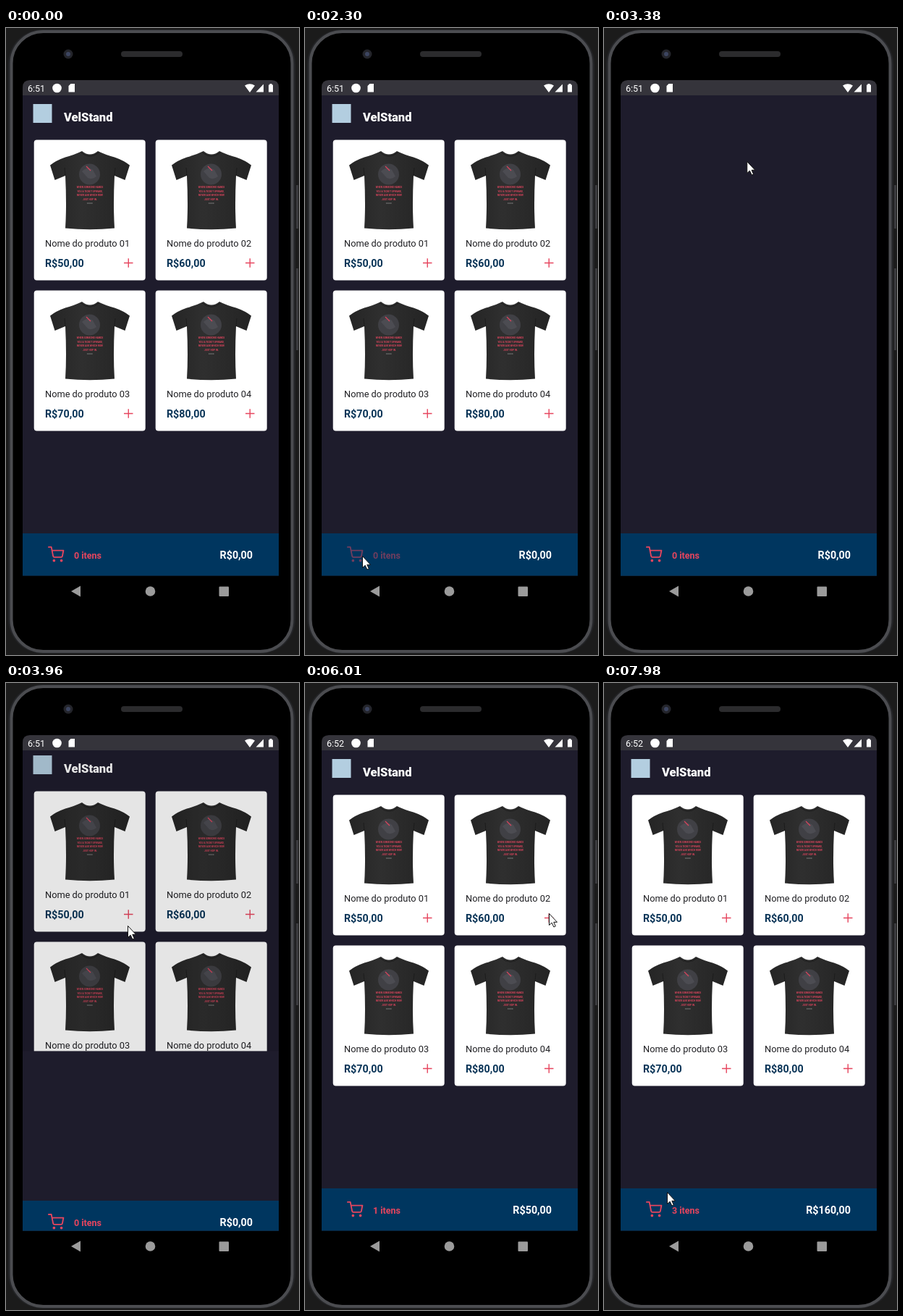
Animation of 405 by 866 pixels, one loop 8 s. Source, as an HTML page:

```html
<!DOCTYPE html>
<html lang="pt">
<head>
<meta charset="utf-8">
<style>
  html, body { margin: 0; width: 100%; height: 100%; overflow: hidden; background: #1b1b1b; }
  svg { display: block; }
  text { font-family: Roboto, sans-serif; }
  .price { font-size: 14.3px; font-weight: 700; }
  .print { font-size: 3.2px; font-weight: 600; fill: #d8445c; text-anchor: middle; }
  .plus { fill: none; stroke: #e6455e; stroke-width: 1.4; }
</style>
</head>
<body>
<svg width="405" height="866" viewBox="0 0 405 866">
  <defs>
    <linearGradient id="cloth">
      <stop offset="0" stop-color="#252525"/>
      <stop offset=".4" stop-color="#2f2f2f"/>
      <stop offset="1" stop-color="#242424"/>
    </linearGradient>
    <g id="shirt">
      <path fill="url(#cloth)" d="M66 15Q77 24 88 15Q98 20 111 23.500Q124 28 132 34.500L125.500 55L111 49Q109 90 111 121.500Q77 125 43 121.500Q45 90 43 49L28.500 55L22 34.500Q30 28 43 23.500Q56 20 66 15Z"/>
      <path fill="none" stroke="#1c1c1c" d="M64 16.500Q77 28 90 16.500M43 49L42 38M111 49L112 38"/>
      <circle cx="76.500" cy="47" r="14.500" fill="#404045"/>
      <path fill="#4c4c52" d="M66 43q8-8 15-2l5 9q-6 5-12 2z"/>
      <path stroke="#d8445c" stroke-width="1.300" d="M72 36l6 6"/>
      <g class="print">
        <text x="77" y="66">WHEN SOMEONE HANDS</text>
        <text x="77" y="71.500">YOU A TICKET UPWARD,</text>
        <text x="77" y="77">NEVER ASK WHICH ROW</text>
        <text x="77" y="82.500">JUST HOP IN.</text>
      </g>
      <path stroke="#aaa" stroke-width=".8" stroke-dasharray="1.500 .5" d="M73 87h8"/>
    </g>
    <g id="footer">
      <rect y="605" width="354" height="100" fill="#00365f"/>
      <g id="cartButton">
        <g transform="translate(35 623) scale(.93)" fill="none" stroke="#e6455e" stroke-width="2" stroke-linecap="round" stroke-linejoin="round">
          <circle cx="9" cy="21" r="1"/><circle cx="20" cy="21" r="1"/>
          <path d="M1 1h4l2.680 13.390a2 2 0 0 0 2 1.610h9.720a2 2 0 0 0 2-1.610L23 6H6"/>
        </g>
        <text id="items" x="71" y="639.500" font-size="12.500" font-weight="700" fill="#e6455e"></text>
      </g>
      <text id="total" class="price" x="318" y="640" text-anchor="end" fill="#fff"></text>
    </g>
  </defs>

  <!-- phone -->
  <rect width="405" height="866" fill="#1b1b1b"/>
  <path fill="#3b3b3e" d="M401 217h3v60h-3zM401 332h3v113h-3z"/>
  <rect x="3" y="2" width="397" height="862" rx="48" fill="#242528"/>
  <rect x="7.500" y="5" width="388" height="856" rx="44" stroke="#4b4c50" stroke-width="4"/>
  <rect x="13" y="10" width="377" height="846" rx="39"/>
  <circle cx="86" cy="36" r="6.500" fill="#24252b"/>
  <circle cx="86" cy="36" r="3" fill="#3c4560"/>
  <rect x="159" y="32" width="85" height="8" rx="4" fill="#2b2b2d"/>

  <!-- status bar -->
  <path fill="#35343b" d="M23 94V82q0-10 10-10H367q10 0 10 10V94z"/>
  <g fill="#fff">
    <text id="clock" x="30" y="87.500" font-size="12.500"></text>
    <circle cx="70.500" cy="83" r="6.300"/>
    <path d="M89.500 77H95V88.500H86.500V80zM337 89L330 79.500Q337 75 344 79.500ZM345.500 88.500L356 77.500V88.500zM363 78.500h1.500v-1.500h3v1.500h1.500v10h-6z"/>
  </g>

  <!-- app -->
  <svg x="23" y="93" width="354" height="663.500">
    <rect width="354" height="664" fill="#1e1c2c"/>
    <g id="home">
      <rect x="14.500" y="12" width="26" height="26" fill="#b3cee0"/>
      <text x="57" y="36" font-size="16.500" font-weight="800" fill="#fff">VelStand</text>
      <g id="cards"></g>
      <use href="#footer"/>
    </g>
    <rect id="dim" width="354" height="664"/>
    <svg id="cart" width="354" height="664">
      <rect width="354" height="664" fill="#1e1c2c"/>
      <use id="cartFooter" href="#footer"/>
    </svg>
  </svg>

  <!-- navigation bar -->
  <g fill="#9b9b9b">
    <path d="M90 778L103 770.500V785.500z"/>
    <circle cx="199.500" cy="778" r="6.800"/>
    <rect x="294.500" y="771.500" width="13.500" height="13.500" rx="1"/>
  </g>
  <path id="cursor" fill="#fff" stroke="#111" d="M.5.5V16.500L4.200 13.200L6.900 19L9.300 17.900L6.800 12.300H11.500z"/>
</svg>

<script>
const $ = id => document.getElementById(id);
const clamp = v => Math.min(1, Math.max(0, v));

const LOOP = 8000, HEIGHT = 664;
const OPEN_AT = 2305, CLOSE_AT = 3882, SLIDE = 425, MINUTE_AT = 4200;
const CART_TAP = 2130;
const taps = [
  { at: 5200, product: 0 },
  { at: 6080, product: 1 },
  { at: 6900, product: 0 },
];
const prices = [50, 60, 70, 80];

// Pointer stops: time, x, y
const stops = [
  [280, 333, 842], [500, 273, 730], [1040, 273, 730], [1270, 195, 668],
  [1490, 137, 727], [1840, 90, 730], [2080, 79, 729], [2670, 79, 729],
  [2920, 50, 400], [3140, 60, 95], [3460, 222, 200], [3880, 168, 335],
  [3960, 168, 335], [4280, 179, 338], [4430, 180, 338], [4570, 179, 336],
  [4980, 179, 336], [5180, 165, 318], [5400, 165, 318], [5770, 323, 325],
  [5980, 337, 318], [6280, 337, 318], [6600, 300, 309], [6860, 165, 325],
  [7080, 165, 325], [7390, 242, 251], [7440, 242, 251], [7980, 87, 703],
];

const money = value => `R$${value},00`;

$('cards').innerHTML = prices.map((price, i) => `
  <g transform="translate(${16 + i % 2 * 168} ${62 + (i >> 1) * 208})">
    <rect x="-.3" y="-.5" width="154" height="194" rx="4" fill="#fff"/>
    <use href="#shirt"/>
    <text x="15" y="147" font-size="12.800" fill="#202024">Nome do produto 0${i + 1}</text>
    <text class="price" x="15" y="175" fill="#0b3558">${money(price)}</text>
    <path class="plus" d="M124 169.500h12.500M130.250 163.250v12.500"/>
  </g>`).join('');
const pluses = document.querySelectorAll('.plus');

// cubic-bezier(.20833, .82, .25, 1)
function slideEase(x) {
  const curve = (s, a, b) => 3 * s * (1 - s) ** 2 * a + 3 * s * s * (1 - s) * b + s ** 3;
  let low = 0, high = 1;
  for (let i = 0; i < 20; i++) {
    const mid = (low + high) / 2;
    if (curve(mid, .20833, .25) < x) low = mid; else high = mid;
  }
  return curve(low, .82, 1);
}

const PRESS = 80, RELEASE = 250;
function pressOpacity(t, at) {
  const d = t - at;
  return 1 - .8 * clamp(Math.min(d / PRESS, 1 - (d - PRESS) / RELEASE));
}

function drawPointer(t) {
  const next = stops.findIndex(stop => stop[0] > t);
  const visible = t >= stops[0][0];
  $('cursor').style.display = visible ? '' : 'none';
  if (!visible) return;
  const b = next < 0 ? stops.at(-1) : stops[next];
  const a = next < 0 ? b : stops[next - 1];
  const u = clamp((t - a[0]) / (b[0] - a[0] || 1));
  const e = u * u * (3 - 2 * u);
  const at = i => a[i] + (b[i] - a[i]) * e;
  $('cursor').setAttribute('transform', `translate(${at(1)} ${at(2)})`);
}

// The cart is uncovered from below while the store drifts up
function drawScreens(t) {
  const shown = slideEase(clamp((t - OPEN_AT) / SLIDE)) - slideEase(clamp((t - CLOSE_AT) / SLIDE));
  const top = HEIGHT * (1 - shown);
  $('home').setAttribute('transform', `translate(0 ${-.02 * HEIGHT * shown})`);
  $('dim').setAttribute('opacity', .1 * clamp(shown / .36));
  $('cart').style.display = shown > .001 ? '' : 'none';
  $('cart').setAttribute('y', top);
  $('cartFooter').setAttribute('transform', `translate(0 ${-.959 * top})`);
}

function drawOrder(t) {
  const done = taps.filter(tap => t >= tap.at + PRESS);
  $('items').textContent = `${done.length} itens`;
  $('total').textContent = money(done.reduce((sum, tap) => sum + prices[tap.product], 0));
  $('cartButton').setAttribute('opacity', pressOpacity(t, CART_TAP));
  pluses.forEach((plus, i) => {
    const own = taps.filter(tap => tap.product === i);
    plus.setAttribute('opacity', Math.min(1, ...own.map(tap => pressOpacity(t, tap.at))));
  });
}

function frame() {
  const t = performance.now() % LOOP;
  $('clock').textContent = t < MINUTE_AT ? '6:51' : '6:52';
  drawScreens(t);
  drawOrder(t);
  drawPointer(t);
  requestAnimationFrame(frame);
}
frame();
</script>
</body>
</html>
```
